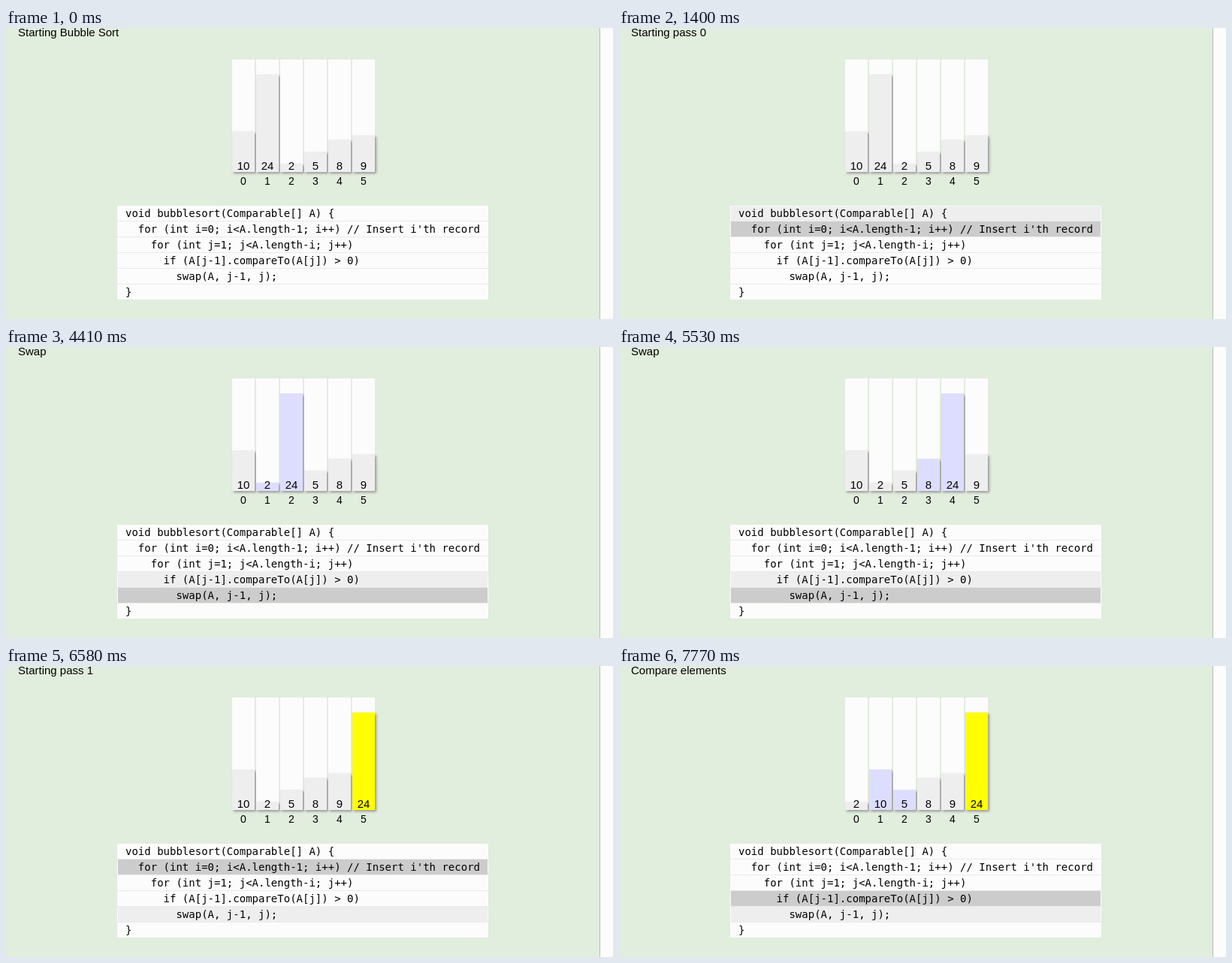
An HTML page that plays this animation: 808x388 px, repeating every 8000 ms.

```html
<!DOCTYPE html>
<html lang="en">
<head>
<meta charset="utf-8">
<title>Bubble Sort</title>
<style>
  html, body { margin: 0; width: 100%; height: 100%; overflow: hidden; }
  body { position: relative; background: #e1eddd; color: #000; }
  body div { position: absolute; box-sizing: border-box; }
  #edge { left: 790px; top: 0; right: 0; bottom: 0; background: #fcfcfc; border-left: 1px solid #b4beb1; }
  #note { left: 16px; top: -3px; font: 15px/17px "Liberation Sans", Arial, sans-serif; white-space: pre; }
  .cell { top: 42px; width: 30px; height: 150px; background: #fcfcfc; }
  .bar { left: 0; bottom: 0; width: 30px; box-shadow: 2px 2px 3px #999; }
  .value, .index { left: 0; width: 30px; text-align: center; }
  .value { top: 133px; font: 15px/17px "Liberation Sans", Arial, sans-serif; }
  .index { top: 154px; font: 14px/16px "Liberation Sans", Arial, sans-serif; }
  #code { left: 148px; top: 237px; width: 494px; height: 125px; background: #fcfcfc; }
  .row { left: 1px; width: 492px; height: 20px; padding: 2px 0 0 10px; white-space: pre;
         font: 14px/16px "DejaVu Sans Mono", monospace; }
  .row:first-child { border-top: 1px solid #fcfcfc; padding-top: 1px; }
  .rule { left: 0; width: 494px; height: 1px; background: #e7ede5; }
</style>
</head>
<body>
<div id="edge"></div>
<div id="note"></div>
<div id="code"></div>
<script>
const LOOP = 8000;
const UNIT = 130 / 24; // bar pixels per unit of value
const CODE = [
  "void bubblesort(Comparable[] A) {",
  "  for (int i=0; i<A.length-1; i++) // Insert i'th record",
  "    for (int j=1; j<A.length-i; j++)",
  "      if (A[j-1].compareTo(A[j]) > 0)",
  "        swap(A, j-1, j);",
  "}"
];
const INTRO = "For each pass, we will move left to right swapping adjacent elements as needed. Each pass moves the next\n" +
  "largest element into its final position (these will be shown in yellow).";

// Each step changes only the fields it names. swap: left index, pair: left index of the blue pair.
const CHANGES = [
  { at: 0, note: "Starting Bubble Sort", now: -1, prev: -1, pair: -1, sorted: 6 },
  { at: 560, note: INTRO, now: 0 },
  { at: 1400, note: "Starting pass 0", now: 1, prev: 0 },
  { at: 3080, note: "Compare elements", now: 3, prev: 2, pair: 0 },
  { at: 4410, note: "Swap", now: 4, prev: 3, pair: 1, swap: 1 },
  { at: 4970, pair: 2, swap: 2 },
  { at: 5530, pair: 3, swap: 3 },
  { at: 6090, pair: 4, swap: 4 },
  { at: 6580, note: "Starting pass 1", now: 1, prev: 4, pair: -1, sorted: 5 },
  { at: 7350, note: "Compare elements", now: 3, prev: 2, pair: 0 },
  { at: 7770, prev: 4, pair: 1, swap: 0 }
];

let last = { values: [10, 24, 2, 5, 8, 9] };
const steps = CHANGES.map(change => {
  const values = last.values.slice();
  const s = change.swap;
  if (s !== undefined) [values[s], values[s + 1]] = [values[s + 1], values[s]];
  return last = { ...last, ...change, values };
});

function add(parent, cls, text = "") {
  const el = document.createElement("div");
  el.className = cls;
  el.textContent = text;
  parent.append(el);
  return el;
}

const note = document.getElementById("note");
const codeBox = document.getElementById("code");

const cells = last.values.map((_, i) => {
  const cell = add(document.body, "cell");
  cell.style.left = 301 + 32 * i + "px";
  const bar = add(cell, "bar");
  const value = add(cell, "value");
  add(cell, "index", i);
  return { bar, value };
});

const rows = CODE.map((line, i) => {
  const row = add(codeBox, "row", line);
  row.style.top = 21 * i + "px";
  return row;
});
for (let i = 1; i < CODE.length; i++) add(codeBox, "rule").style.top = 21 * i - 1 + "px";

function barColor(step, i) {
  if (i >= step.sorted) return "#ff0";
  const paired = step.pair >= 0 && (i === step.pair || i === step.pair + 1);
  return paired ? "#ddf" : "#eee";
}

function draw(step) {
  note.textContent = step.note;
  cells.forEach(({ bar, value }, i) => {
    bar.style.height = Math.round(step.values[i] * UNIT) + "px";
    bar.style.background = barColor(step, i);
    value.textContent = step.values[i];
  });
  rows.forEach((row, i) => {
    row.style.backgroundColor = i === step.now ? "#ccc" : i === step.prev ? "#eee" : "#fcfcfc";
  });
}

const start = performance.now();
let shown = null;
function tick() {
  const t = (performance.now() - start) % LOOP;
  const step = steps.filter(s => s.at <= t).pop();
  if (step !== shown) draw(shown = step);
  requestAnimationFrame(tick);
}
tick();
</script>
</body>
</html>
```
